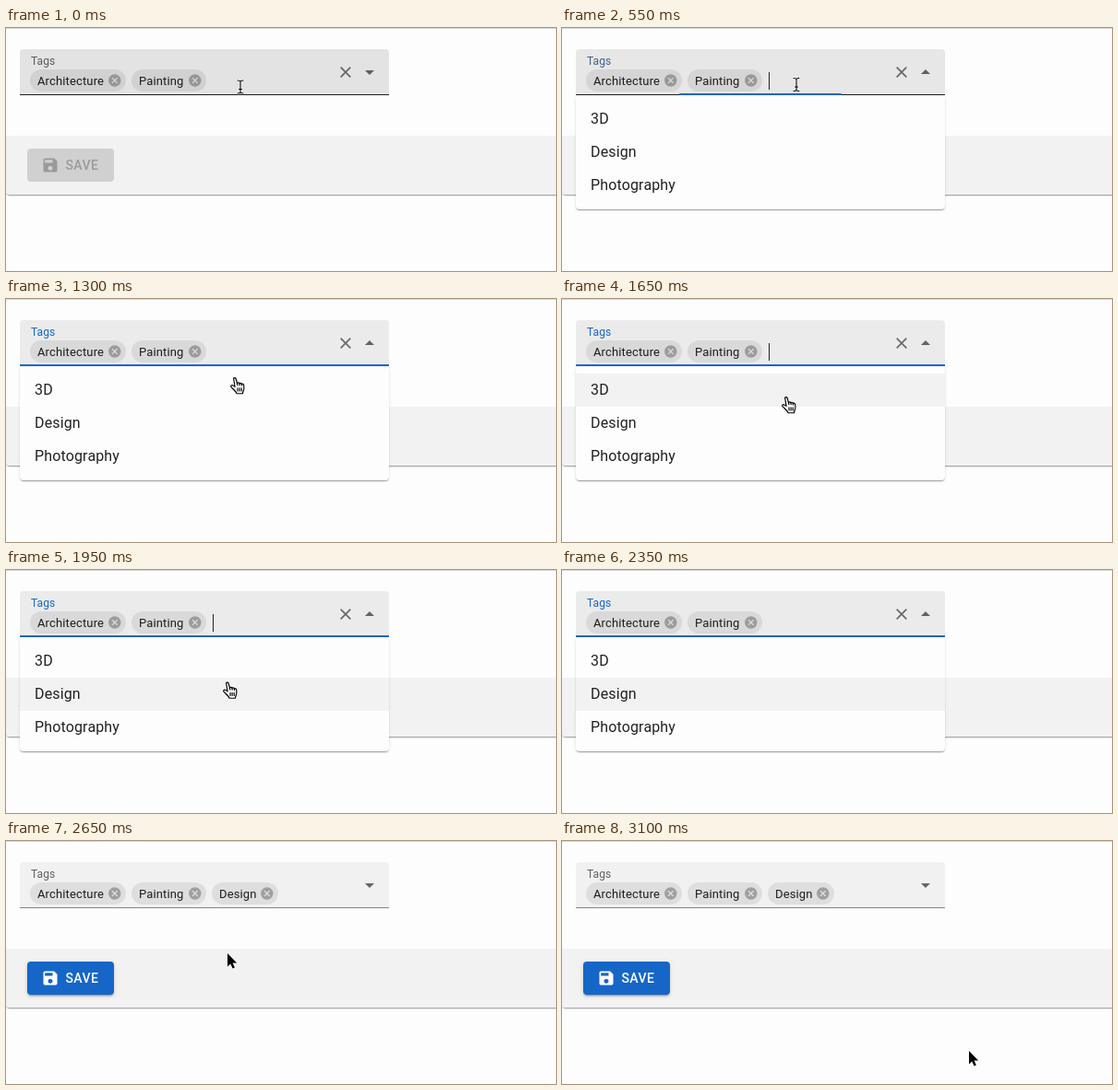
These frames come from a looping animation (596 px wide and 264 px high, 3150 ms). An HTML page:

```html
<!DOCTYPE html>
<html lang="en">
<head>
<meta charset="utf-8">
<title>Tags field</title>
<style>
html, body { margin: 0; width: 100%; height: 100%; overflow: hidden; background: #fdfdfd; }
#stage { position: absolute; left: 0; top: 0; width: 596px; height: 264px; overflow: hidden; }
#stage > * { position: absolute; box-sizing: border-box; }
svg { display: block; overflow: visible; }
text { font-family: Roboto, Arial, sans-serif; }
.paper { box-shadow: 0 2px 1px -1px rgba(0,0,0,.2), 0 1px 1px rgba(0,0,0,.14), 0 1px 3px rgba(0,0,0,.12); }
#card { left: 0; top: -20px; width: 620px; height: 201px; border-radius: 4px; background: #fdfdfd; }
#topLine { left: 0; top: 0; width: 596px; height: 1px; background: #d9d9d9; }
#footer { left: 0; top: 117px; width: 620px; height: 64px; border-radius: 0 0 4px 4px; background: #f2f2f2; }
#save { left: 23px; top: 131px; width: 94px; height: 36px; border-radius: 4px; }
#save text { font-size: 14px; font-weight: 500; letter-spacing: .4px; }
#field { left: 15px; top: 23px; width: 400px; height: 50px; border-radius: 4px 4px 0 0; }
#menu { left: 15px; top: 73px; width: 400px; height: 124px; border-radius: 4px; background: #fdfdfd; }
#overlay { left: 0; top: 0; }
#label { font-size: 12px; letter-spacing: .11px; }
.chip text { font-size: 13px; letter-spacing: .14px; fill: rgba(0,0,0,.87); }
.option { font-size: 16px; letter-spacing: .15px; fill: rgba(0,0,0,.87); }
</style>
</head>
<body>
<div id="stage">
  <div id="card" class="paper"></div>
  <div id="topLine"></div>
  <div id="footer"></div>
  <div id="save">
    <svg width="94" height="36">
      <path transform="translate(15 8) scale(.8333)" d="M17 3H5c-1.11 0-2 .9-2 2v14c0 1.1.89 2 2 2h14c1.1 0 2-.9 2-2V7l-4-4zm-5 16c-1.66 0-3-1.34-3-3s1.34-3 3-3 3 1.34 3 3-1.34 3-3 3zm3-10H5V5h10v4z"/>
      <text x="41.5" y="23">SAVE</text>
    </svg>
  </div>
  <div id="field"></div>
  <div id="menu" class="paper"></div>
  <svg id="overlay" width="596" height="264">
    <defs>
      <path id="cancel" d="M12 2C6.47 2 2 6.47 2 12s4.47 10 10 10 10-4.47 10-10S17.53 2 12 2zm5 13.59L15.59 17 12 13.41 8.41 17 7 15.59 10.59 12 7 8.41 8.41 7 12 10.59 15.59 7 17 8.41 13.41 12 17 15.59z"/>
    </defs>
    <text id="label" x="27" y="40">Tags</text>
    <g id="chips"></g>
    <path id="clear" d="M362.7 42.7l10.6 10.6m0-10.6l-10.6 10.6" stroke="#000" stroke-opacity=".56" stroke-width="1.65"/>
    <path id="arrow" d="M-5-2.5h10l-5 5z" fill="#000" fill-opacity=".58"/>
    <rect id="border" x="15" y="72" width="400" height="1"/>
    <rect id="focusLine" y="71" height="2"/>
    <rect id="caret" x="224" y="48" width="1" height="19" fill="#222"/>
    <g id="options"><rect id="highlight" x="15" width="400" height="36" fill="#000" fill-opacity=".042"/></g>
    <g id="cursor">
      <g id="ibeam" fill="none" stroke-linecap="round">
        <path d="M-3-7Q-.4-7 0-5.8 .4-7 3-7M-3 7Q-.4 7 0 5.8 .4 7 3 7M0-6V6M-1.5 2.5h3" stroke="#fff" stroke-opacity=".7" stroke-width="2.4"/>
        <path d="M-3-7Q-.4-7 0-5.8 .4-7 3-7M-3 7Q-.4 7 0 5.8 .4 7 3 7M0-6V6M-1.5 2.5h3" stroke="#000" stroke-width="1.1"/>
      </g>
      <g id="hand" stroke="#000" stroke-width="1.15" stroke-linejoin="round" stroke-linecap="round">
        <path fill="#fff" d="M-1.4.9C-1-.2.7-.2 1.1 1L2.4 6C2.9 5.2 4.4 5.2 4.9 6.3 5.5 5.6 6.9 5.8 7.3 6.9 8 6.4 9.5 6.9 9.7 8.2L9.9 11.2C9.9 13.4 8.7 14.4 8.5 17.2H2C1.6 15-1.6 12.8-4 10.2-5 9-3.3 7.5-1.7 8.6L.1 9.9z"/>
        <path fill="none" d="M3 11.2v3.3m2.1-3.3v3.3m2.1-3.3v3.3M2.4 6l.5 2.2m2-1.9l.3 1.9m2.1-1.3l.2 1.6"/>
      </g>
      <path id="pointer" d="M0 0V14.5L3.3 11.4 5.6 16.6 7.9 15.6 5.6 10.5H10.2z" stroke="#fff" stroke-width="1" paint-order="stroke"/>
    </g>
  </svg>
</div>
<script>
const LOOP = 3150, STEP = 50;
const OPEN = 550, CLOSE = 2400;
const BLUE = [22, 102, 200, 1];
const $ = id => document.getElementById(id);
const svgNS = "http://www.w3.org/2000/svg";

function add(parent, tag, attrs, text) {
  const el = document.createElementNS(svgNS, tag);
  for (const key in attrs) el.setAttribute(key, attrs[key]);
  if (text) el.textContent = text;
  return parent.appendChild(el);
}

const chips = [["Architecture", 26, 104], ["Painting", 136, 81], ["Design", 223, 72]].map(([name, x, width]) => {
  const g = add($("chips"), "g", { class: "chip" });
  add(g, "rect", { x, y: 45, width, height: 24, rx: 12, "fill-opacity": .08 });
  add(g, "text", { x: x + 8, y: 62 }, name);
  add(g, "use", {
    href: "#cancel", "fill-opacity": .28,
    transform: `translate(${x + width - 20.2} 49) scale(.6667)`
  });
  return g;
});

["3D", "Design", "Photography"].forEach((name, i) =>
  add($("options"), "text", { class: "option", x: 31, y: 104 + 36 * i }, name));

const clamp = v => Math.min(1, Math.max(0, v));
const lerp = (a, b, p) => a + (b - a) * p;

// CSS-style cubic-bezier easing, solved by bisection
const bezier = (x1, y1, x2, y2) => x => {
  if (x <= 0 || x >= 1) return clamp(x);
  const curve = (a, b, s) => 3 * (1 - s) * (1 - s) * s * a + 3 * (1 - s) * s * s * b + s ** 3;
  let lo = 0, hi = 1;
  for (let i = 0; i < 24; i++) {
    const mid = (lo + hi) / 2;
    if (curve(x1, x2, mid) < x) lo = mid; else hi = mid;
  }
  return curve(y1, y2, lo);
};
const easeOut = bezier(0, 0, .2, 1);
const easeInOut = bezier(.4, 0, .2, 1);

// Mixes two RGBA colours with premultiplied alpha
function mix(a, b, p) {
  const alpha = lerp(a[3], b[3], p);
  const rgb = [0, 1, 2].map(i => alpha ? lerp(a[i] * a[3], b[i] * b[3], p) / alpha : 0);
  return `rgba(${rgb.map(v => v.toFixed(1))},${alpha.toFixed(4)})`;
}

// time, x, y of the cursor hotspot
const path = [
  [0, 254, 64], [100, 254, 64], [200, 254, 61.5], [900, 254, 61.5], [1300, 248, 85.5],
  [1450, 244, 103], [1650, 243, 106.5], [1950, 240, 122], [2850, 240, 122], [3100, 441, 228]
];

function cursorAt(t) {
  const i = path.findIndex(k => k[0] > t);
  if (i < 0) return path[path.length - 1].slice(1);
  const a = path[i - 1], b = path[i];
  let p = (t - a[0]) / (b[0] - a[0]);
  if (a[0] === 2850) p = p * p * (3 - 2 * p);
  return [lerp(a[1], b[1], p), lerp(a[2], b[2], p)];
}

const show = (el, on) => { el.style.display = on ? "" : "none"; };

function drawField(t, open) {
  const focusIn = easeOut((t - 517) / 200);
  const focusOut = easeOut((t - 2367) / 200);
  const focus = focusIn * (1 - focusOut);
  const shade = lerp(lerp(227, 235, focusIn), 241, focusOut);
  $("field").style.background = `rgb(${shade},${shade},${shade})`;
  $("label").style.fill = mix([0, 0, 0, .6], BLUE, focus);
  $("border").setAttribute("fill-opacity", lerp(.87, .46, focusOut));
  $("focusLine").setAttribute("x", 215 - 200 * focus);
  $("focusLine").setAttribute("width", 400 * focus);
  $("arrow").setAttribute("transform", `translate(394 ${open ? 47.5 : 48.5}) scale(1 ${open ? -1 : 1})`);
  show($("clear"), t < CLOSE);
  show(chips[2], t >= CLOSE);
  show($("caret"), open && Math.floor((t - OPEN) / 500) % 2 === 0);
}

function drawMenu(t, open) {
  show($("menu"), open);
  show($("options"), open);
  show($("highlight"), t >= 1350);
  $("highlight").setAttribute("y", t >= 1850 ? 117 : 81);
}

function drawButton(t) {
  const p = easeInOut((t - 2381) / 250);
  const style = $("save").style;
  style.background = mix([0, 0, 0, .14], BLUE, p);
  style.fill = mix([0, 0, 0, .26], [255, 255, 255, 1], p);
  style.boxShadow = `0 3px 1px -2px rgba(0,0,0,${.2 * p}), 0 2px 2px rgba(0,0,0,${.14 * p}), 0 1px 5px rgba(0,0,0,${.12 * p})`;
}

function drawCursor(t, open) {
  const [x, y] = cursorAt(t);
  const kind = y < 73 ? "ibeam" : open && y > 81 ? "hand" : "pointer";
  for (const id of ["ibeam", "hand", "pointer"]) show($(id), id === kind);
  show($("cursor"), t < 2350 || t >= CLOSE);
  $("cursor").setAttribute("transform", `translate(${x} ${y})`);
}

function render(time) {
  const t = Math.floor((time % LOOP) / STEP) * STEP;
  const open = t >= OPEN && t < CLOSE;
  drawField(t, open);
  drawMenu(t, open);
  drawButton(t);
  drawCursor(t, open);
}

$("focusLine").style.fill = mix(BLUE, BLUE, 0);
const start = performance.now();
function tick() {
  render(performance.now() - start);
  requestAnimationFrame(tick);
}
tick();
</script>
</body>
</html>
```
